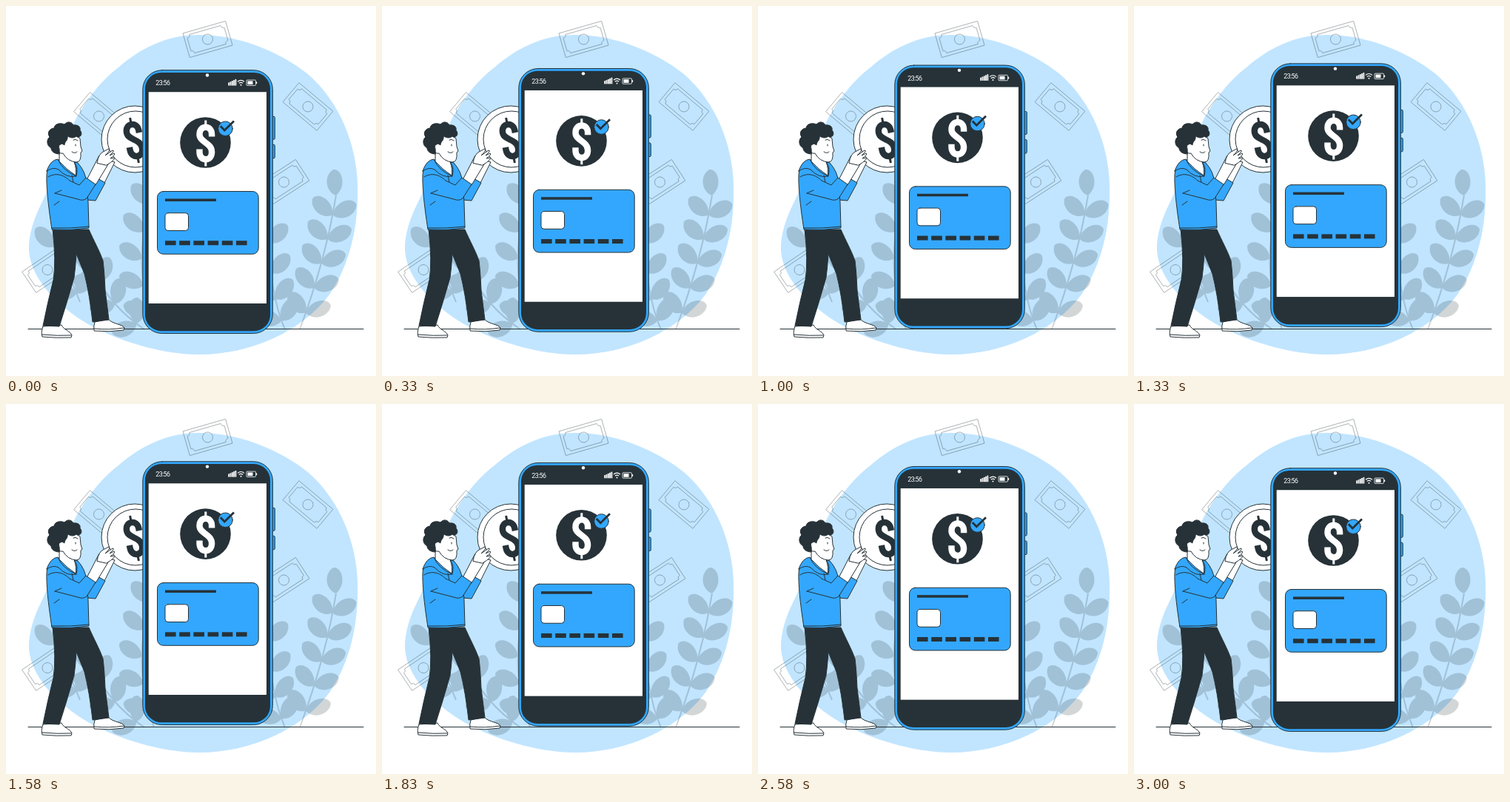
Animation of 500x500 px, one loop 3.04 s. Source, as an HTML page:

```html
<!DOCTYPE html>
<html lang="en">
<head>
<meta charset="utf-8">
<title>Mobile payment</title>
<style>
html, body { margin: 0; width: 100%; height: 100%; overflow: hidden; background: #fff; }
svg { display: block; width: 100%; height: 100%; }
.ink { fill: #263238; }
.blue { fill: #33a7fd; }
.white { fill: #fff; }
.line { stroke: #263238; stroke-width: 1; stroke-linejoin: round; stroke-linecap: round; }
.none { fill: none; }
.clock { font: 400 8.9px Roboto, "Liberation Sans", sans-serif; letter-spacing: -.6px; }
</style>
</head>
<body>
<svg viewBox="0 0 500 500">
  <defs>
    <path id="leaf" d="M0 0C.15-.4 .8-.45 1-.06C1.03.28.35.45 0 0Z"/>
    <g id="bill" fill="none" stroke="#263238" stroke-width=".9" opacity=".38">
      <rect x="-30" y="-17" width="60" height="34"/>
      <path d="M-22-13H22Q22-9 26-9V9Q22 9 22 13H-22Q-22 9-26 9V-9Q-22-9-22-13Z"/>
      <circle r="7"/>
    </g>
    <g id="dollar" fill="none">
      <path stroke-width="8.4" d="M8.3-9V-12C8.3-25-8.3-25-8.3-12C-8.3-1 8.3-1 8.3 12C8.3 25-8.3 25-8.3 12V8"/>
      <path stroke-width="3" d="M0-31V-20M0 20V31"/>
    </g>
  </defs>

  <path fill="#c1e5ff" d="M261 39C315 39 370 62 408 92C452 130 474 190 475 240C477 300 464 350 437 390C400 440 330 471 261 471C210 471 150 452 111 430C70 406 28 365 31 322C35 275 66 243 76 202C87 154 118 109 152 83C183 56 218 39 261 39Z"/>
  <g id="bills"></g>
  <g id="plants" opacity=".2" class="ink"></g>
  <path class="line" d="M30 436.5H483"/>

  <circle class="white line" cx="174" cy="180" r="45"/>
  <circle class="white line" cx="175" cy="180" r="38"/>
  <use href="#dollar" stroke="#263238" transform="translate(173.5 181.5) rotate(-11)"/>

  <g id="person" class="line">
    <path class="white" d="M50 433L75 431C78 438 87 439 89 445L88 448Q68 449 49 447Q47 441 50 433Z"/>
    <path class="white" d="M120 427L138 423C144 430 158 430 160 435L159 438Q140 441 119 439Q118 433 120 427Z"/>
    <path class="none" d="M49 444Q70 446 88 445M119 436Q140 438 159 435"/>
    <path class="ink" d="M63 302H112C119 318 126 330 131 344Q133 360 134 384L139 424L117 427Q113 390 106 362L95 335Q94 352 92 367Q82 402 72 433L50 432Q56 402 64 370Q68 345 63 302Z"/>
    <path class="white" d="M124 233L137 208L147 211L133 239Z"/>
    <path class="blue" d="M108 239L124 233L134 239L121 263L109 262Z"/>
    <path class="blue" d="M56 222Q62 208 77 207L97 212Q108 224 109 240L111 265L112 300Q87 304 62 302Q54 250 55 228Z"/>
    <path class="white" d="M72 194V210Q83 222 94 229Q96 222 92 210Z"/>
    <path class="white" d="M73 179Q88 168 100 179L101 190L103 196L101 198Q102 211 95 211Q83 210 77 199C70 201 67 188 74 187Z"/>
    <path class="ink" d="M72 200C65 200 61 196 61 192C54 188 55 180 59 177C54 170 61 165 65 165C66 158 75 158 79 160C84 154 90 158 91 161C98 160 101 164 100 168C105 173 99 180 95 176C90 180 86 177 83 176C84 182 79 183 79 188C74 184 70 187 72 193Z"/>
    <path class="none" d="M91 181Q94 179 97 182M89 197Q93 200 96 197M94 187V189"/>
    <path class="blue" d="M55 223Q60 208 70 207Q76 222 95 230Q82 233 71 221Q64 217 55 223Z"/>
    <path class="none" d="M93 212Q98 219 95 230M89 229L91 238"/>
    <path class="white" d="M109 235L126 202L141 209L121 242Z"/>
    <path class="blue" d="M57 231C68 224 79 229 86 236L99 242L108 232L121 241L109 260Q104 264 97 261L66 253"/>
    <path class="none" d="M66 253L75 249M65 269L72 264M62 300Q87 301 112 298"/>
    <path class="white" d="M123 212Q125 199 133 196L139 193Q142 194 134 202L144 195Q148 195 140 202L146 199Q149 200 141 206L146 205Q149 207 136 215Z"/>
  </g>

  <g id="phone">
    <g class="blue line">
      <rect x="356" y="149.5" width="7.3" height="31" rx="1.5"/>
      <rect x="356" y="187.5" width="7.3" height="18.5" rx="1.5"/>
      <rect x="184.8" y="87" width="175.6" height="355.7" rx="26"/>
    </g>
    <rect class="ink" x="188" y="90.2" width="169" height="349.3" rx="22"/>
    <rect class="white" x="192.7" y="116.5" width="159.3" height="285.7"/>
    <g class="white">
      <circle cx="272" cy="93.8" r="2.2"/>
      <text class="clock" x="202.3" y="107.6">23:56</text>
      <g id="signal"></g>
      <circle cx="317.5" cy="107" r="1"/>
      <rect x="326.5" y="101.7" width="7" height="4.6"/>
      <rect x="338" y="102.7" width="1.2" height="2.6"/>
    </g>
    <g fill="none" stroke="#fff">
      <path stroke-width="1.1" d="M313 102.5Q317.5 98.8 322 102.5M314.8 104.7Q317.5 102.5 320.2 104.7"/>
      <rect x="325" y="100.3" width="12.5" height="7.4" rx="1" stroke-width=".8"/>
    </g>

    <circle class="ink" cx="269.5" cy="184.8" r="34.3"/>
    <use href="#dollar" stroke="#fff" transform="translate(269.8 185.7)"/>
    <circle class="blue line" cx="296.5" cy="166" r="9.8"/>
    <path fill="none" stroke="#263238" stroke-width="2.8" d="M289.8 162.5L295.3 168.2L308 155.7"/>

    <rect class="blue line" x="204.5" y="250.8" width="136.7" height="84.7" rx="8"/>
    <rect class="ink" x="215" y="260.7" width="69" height="3.5"/>
    <rect class="white line" x="215" y="280" width="31.5" height="23.8" rx="4"/>
    <g id="digits" class="ink"></g>
  </g>
</svg>
<script>
const $ = id => document.getElementById(id);
const repeat = (n, draw) => Array.from({ length: n }, (_, i) => draw(i)).join('');
const bill = (x, y, angle) => `<use href="#bill" transform="translate(${x} ${y}) rotate(${angle})"/>`;

// A curved stem with evenly spaced leaf pairs and one leaf at its tip.
function frond([x0, y0], [x1, y1], [x2, y2], pairs) {
  const curve = (a, b, c, t) => (1 - t) ** 2 * a + 2 * t * (1 - t) * b + t * t * c;
  const slope = (a, b, c, t) => (1 - t) * (b - a) + t * (c - b);
  const leaf = (t, spread, flip) => {
    const angle = Math.atan2(slope(y0, y1, y2, t), slope(x0, x1, x2, t)) * 180 / Math.PI + spread;
    return `<use href="#leaf" transform="translate(${curve(x0, x1, x2, t)} ${curve(y0, y1, y2, t)})
      rotate(${angle}) scale(35 ${35 * flip})"/>`;
  };
  return `<path d="M${x0} ${y0}Q${x1} ${y1} ${x2} ${y2}" fill="none" stroke="#263238" stroke-width="2"/>` +
    repeat(pairs, i => {
      const t = 0.12 + 0.73 * i / Math.max(1, pairs - 1);
      return leaf(t, -58, 1) + leaf(t, 52, -1);
    }) + leaf(1, -12, 1);
}

$('bills').innerHTML = bill(272.5, 45, -16) + bill(125.5, 149, 40) + bill(408, 136, 40) +
  bill(375.5, 238, -33) + bill(56, 356.5, -34);

$('plants').innerHTML =
  frond([397, 437], [432, 343], [446, 256], 5) +
  frond([377, 437], [356, 390], [352, 290], 4) +
  frond([187, 437], [140, 405], [118, 358], 3) +
  frond([200, 437], [165, 340], [205, 235], 5) +
  frond([100, 400], [80, 350], [65, 325], 1);

$('signal').innerHTML = repeat(5, i =>
  `<rect x="${300.3 + i * 2.3}" y="${103.6 - i * 1.1}" width="1.8" height="${4.2 + i * 1.1}"/>`);
$('digits').innerHTML = repeat(6, i =>
  `<rect x="${215 + i * 19.2}" y="317.5" width="14.6" height="6"/>`);

const LOOP = 3040, FLOAT = 3000, RISE = 10, LEAD = 40;

function render(time) {
  const phase = (time % LOOP + LEAD) % FLOAT / FLOAT;
  const lift = RISE * (1 - Math.abs(1 - 2 * phase));
  $('phone').setAttribute('transform', `translate(0 ${-lift})`);
}

const start = performance.now();
function tick() {
  render(performance.now() - start);
  requestAnimationFrame(tick);
}
tick();
</script>
</body>
</html>
```
